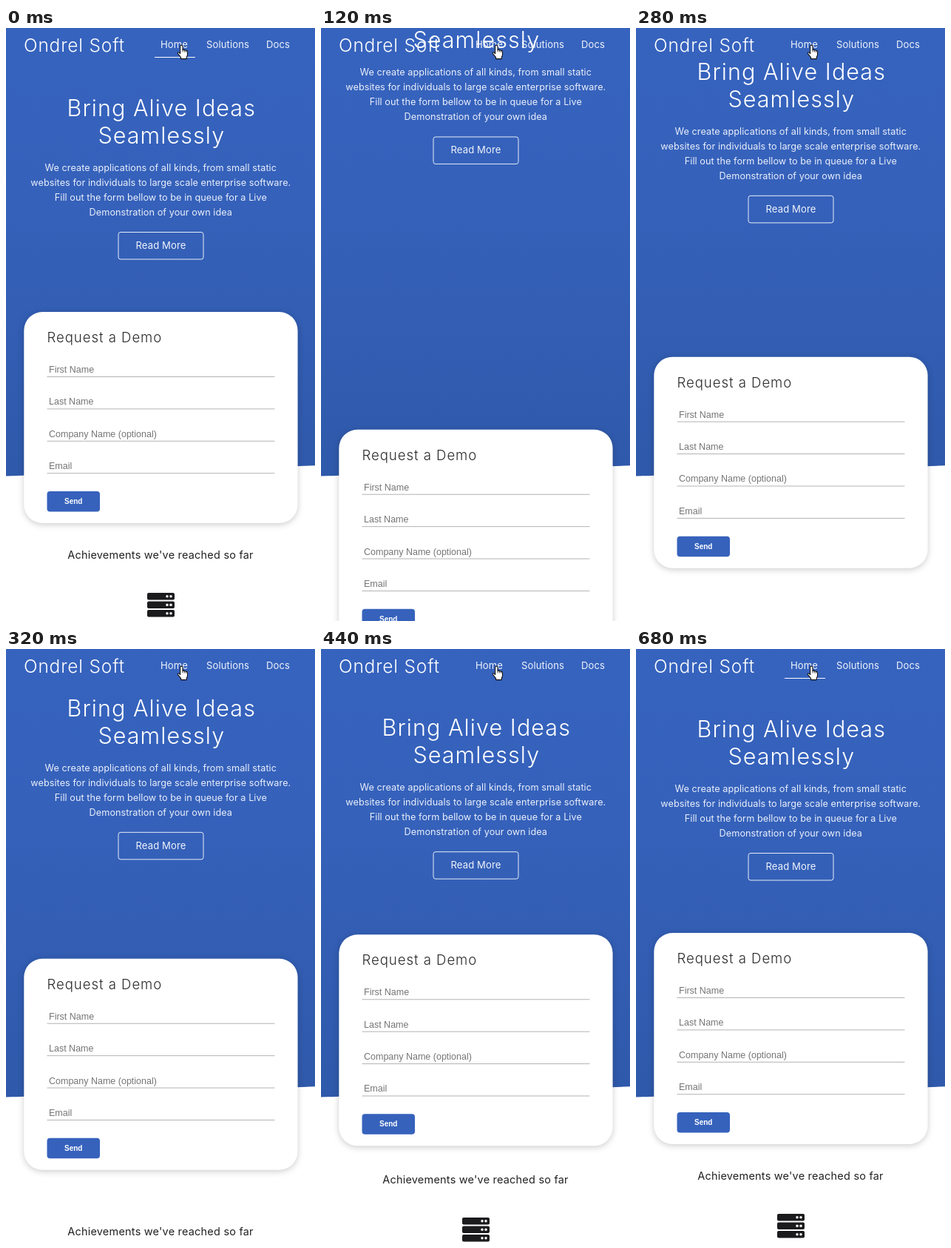
Write an HTML page that moves like this. It is 418 px wide and 800 px high and loops after 720 ms.

```html
<!DOCTYPE html>
<html lang="en">
<head>
<meta charset="utf-8">
<title>Landing page</title>
<style>
  html, body { margin: 0; width: 100%; height: 100%; overflow: hidden; background: #fff; }
  svg { display: block; width: 100vw; height: 100vh; }
  text { font-family: Inter, Lato, sans-serif; white-space: pre; }
  .white { fill: #fff; }
  .mid { text-anchor: middle; }
  .logo { font-size: 24.5px; font-weight: 300; letter-spacing: .8px; }
  .nav { font-size: 13.1px; letter-spacing: .1px; fill: #f0f4fb; }
  .head { font-size: 30.5px; font-weight: 300; letter-spacing: 1.07px; }
  .body { font-size: 12.7px; letter-spacing: .05px; fill: #eaeffa; }
  .title { font-size: 18.6px; font-weight: 300; letter-spacing: .95px; fill: #2b2b2b; }
  .field { font: 12.5px "Liberation Sans", Arial, sans-serif; fill: #757575; }
  .send { font: bold 10px "Liberation Sans", Arial, sans-serif; }
  .note { font-size: 14.5px; letter-spacing: .2px; fill: #222; }
  #card > rect:first-child { filter: drop-shadow(0 2px 4px rgba(0, 0, 0, .2)); }
</style>
</head>
<body>
<svg viewBox="0 0 418 800" preserveAspectRatio="none">
  <defs>
    <linearGradient id="sky" x1="0" y1="0" x2="0" y2="1">
      <stop offset="0" stop-color="#3663be"/>
      <stop offset=".4" stop-color="#3561ba"/>
      <stop offset="1" stop-color="#2f59aa"/>
    </linearGradient>
  </defs>
  <rect width="418" height="800" fill="#fff"/>
  <path d="M0 0H418V590.3L0 604.6Z" fill="url(#sky)"/>

  <g id="more">
    <text class="note mid" x="209" y="716">Achievements we've reached so far</text>
    <g id="server"></g>
  </g>

  <g class="white">
    <text class="logo" x="24" y="32">Ondrel Soft</text>
    <text class="nav" x="209" y="27">Home</text>
    <text class="nav" x="271" y="27">Solutions</text>
    <text class="nav" x="352" y="27">Docs</text>
    <rect id="line" x="201" y="39" width="55" height="1"/>
  </g>

  <g id="hero" class="white">
    <text class="head mid" x="210.3" y="119">Bring Alive Ideas</text>
    <text class="head mid" x="210.3" y="156">Seamlessly</text>
    <g id="copy"></g>
    <rect x="152" y="275.5" width="115" height="36.5" rx="3" fill="none" stroke="#e6ecf8"/>
    <text class="nav mid" x="209.5" y="298">Read More</text>
  </g>

  <g id="card">
    <rect x="24.3" y="383" width="370.3" height="285" rx="25" fill="#fff"/>
    <text class="title" x="55.5" y="424">Request a Demo</text>
    <g id="form"></g>
    <rect x="55.5" y="625" width="71.5" height="27.5" rx="4" fill="#3662bc"/>
    <text class="send white mid" x="91.2" y="642">Send</text>
  </g>

  <path d="M235.7 34.6V24.8a1.65 1.65 0 0 1 3.3 0V29.4q1.6-.8 2.4.5q1.5-.6 2.2.6q1.9-.3 1.9 1.6V35.6q0 2-1.2 3.6V41.6H236.6V39.6L232.7 34.8q-.8-1.6.6-2q1 0 2.4 1.8z"
    fill="#fff" stroke="#111" stroke-width="1.1" stroke-linejoin="round"/>
  <path d="M239 29.4V32.4M241.4 29.9V32.6M243.6 30.5V32.8" fill="none" stroke="#111" stroke-width=".8"/>
</svg>

<script>
const $ = id => document.getElementById(id);

$("copy").innerHTML = [
  "We create applications of all kinds, from small static",
  "websites for individuals to large scale enterprise software.",
  "Fill out the form bellow to be in queue for a Live",
  "Demonstration of your own idea"
].map((s, i) => `<text class="body mid" x="209.3" y="${193 + 20 * i}">${s}</text>`).join("");

$("form").innerHTML = ["First Name", "Last Name", "Company Name (optional)", "Email"].map((s, i) => {
  const y = 465 + 43.4 * i;
  return `<text class="field" x="58" y="${y}">${s}</text>
    <rect x="55.5" y="${y + 5}" width="308" height="1" fill="#b3b3b8"/>`;
}).join("");

$("server").innerHTML = [762, 773.5, 785].map(y =>
  `<rect x="191" y="${y}" width="37" height="9.6" rx="2" fill="#1b1b1d"/>
   <circle cx="218" cy="${y + 4.8}" r="1.7" fill="#fff"/>
   <circle cx="223" cy="${y + 4.8}" r="1.7" fill="#fff"/>`).join("");

const LOOP = 720, STEP = 40;

// Time to progress; the page drops speed and catches up midway.
const pace = [[40, .03], [120, .16], [200, .293], [280, .41], [360, .64], [440, .86], [520, 1]];

function progress(t) {
  if (t < pace[0][0]) return 1;
  for (let i = 1; i < pace.length; i++) {
    const [a, u] = pace[i - 1], [b, v] = pace[i];
    if (t <= b) return u + (v - u) * (t - a) / (b - a);
  }
  return 1;
}

// cubic-bezier(.25, .1, .25, 1)
function ease(x) {
  if (x >= 1) return 1;
  const curve = (s, a, b) => 3 * s * (1 - s) ** 2 * a + 3 * s * s * (1 - s) * b + s ** 3;
  let lo = 0, hi = 1;
  for (let i = 0; i < 24; i++) {
    const s = (lo + hi) / 2;
    if (curve(s, .25, .25) < x) lo = s; else hi = s;
  }
  return curve(lo, .1, 1);
}

const shift = (id, y) => $(id).setAttribute("transform", `translate(0 ${y.toFixed(2)})`);

function draw(time) {
  const t = Math.floor(time % LOOP / STEP) * STEP;
  const left = 1 - ease(progress(t));
  shift("hero", -162 * left);
  shift("card", 200 * left);
  shift("more", 433 * left);
  const fade = t < 40 ? 1 : Math.min(1, Math.max(0, (t - 560) / 120));
  $("line").setAttribute("opacity", fade);
}

let start;
function tick(now) {
  start ??= now;
  draw(now - start);
  requestAnimationFrame(tick);
}
draw(0);
requestAnimationFrame(tick);
</script>
</body>
</html>
```
